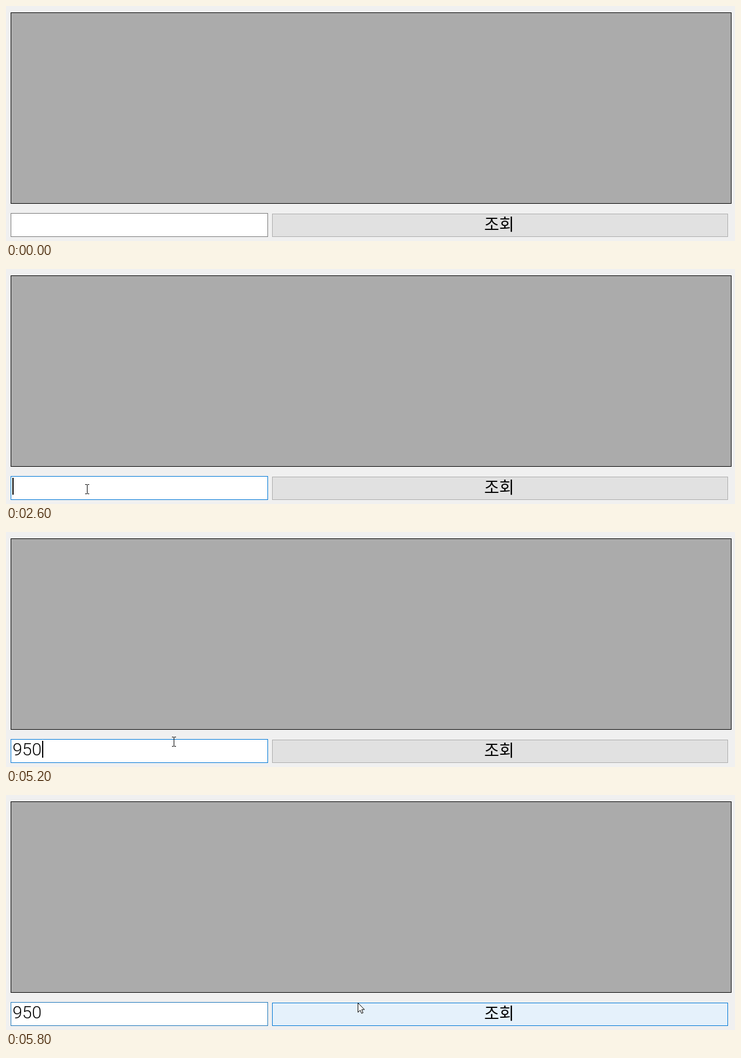
These frames come from a looping animation (1252x404 px, 8000 ms). An HTML page:

```html
<!DOCTYPE html>
<html lang="ko">
<head>
<meta charset="utf-8">
<title>조회</title>
<style>
  html, body { margin: 0; width: 100%; height: 100%; overflow: hidden; background: #f0f0f0; }
  svg { display: block; width: 1252px; height: 404px; }
  rect { shape-rendering: crispEdges; }
  #label { font: 300 28px "Noto Sans CJK KR", "Noto Sans CJK", sans-serif; text-anchor: middle; }
  #value { font: 300 30px Roboto, "Liberation Sans", sans-serif; }
</style>
</head>
<body>
<svg viewBox="0 0 1252 404">
  <rect x="8.5" y="11.5" width="1237" height="328" fill="#ababab" stroke="#000"/>
  <rect id="field" x="8.5" y="356.5" width="441" height="40" fill="#fff"/>
  <rect id="button" x="457.5" y="357.5" width="782" height="39"/>
  <text id="label" x="847" y="386">조회</text>
  <text id="value" x="11.2" y="384.3"></text>
  <rect id="caret" y="359" width="2" height="29"/>
  <path id="arrow" d="M.5.5V16.6L4.3 13 6.7 18.4 9.2 17.4 6.9 11.9H11.6Z" fill="#fff" stroke="#000"/>
  <path id="beam" d="M-3 .5H0M1 .5H4M.5 1V16M-3 16.5H0M1 16.5H4" fill="none" stroke="#000" shape-rendering="crispEdges"/>
</svg>
<script>
const LOOP = 8000;
const el = id => document.getElementById(id);
const [field, button, value, caret, arrow, beam] =
  ['field', 'button', 'value', 'caret', 'arrow', 'beam'].map(el);

const BLUE = '#0078d7';
const looks = {
  idle: ['#e1e1e1', '#adadad'],
  warm: ['#e3e9ee', '#5793c2'],
  hover: ['#e5f1fb', BLUE],
  down: ['#cce4f7', '#005499']
};

// Each step changes only the listed properties.
const steps = [
  [0, { border: '#7a7a7a', look: 'idle', text: '', caret: false, cursor: null, x: 0, y: 0 }],
  [800, { cursor: arrow, x: 131, y: 398 }],
  [900, { border: '#494949', cursor: beam, x: 133, y: 382 }],
  [1000, { border: '#171717', x: 135, y: 378 }],
  [1100, { caret: true }],
  [1200, { border: '#0f3f6b' }],
  [1300, { border: BLUE, y: 377 }],
  [1400, { x: 136, y: 374 }],
  [1500, { x: 138, y: 371 }],
  [1600, { x: 139, y: 370 }],
  [1900, { caret: false }],
  [2600, { caret: true }],
  [3200, { caret: false }],
  [3500, { text: '9', caret: true, cursor: arrow, x: 137, y: 377 }],
  [4100, { caret: false }],
  [4400, { text: '95', caret: true }],
  [4900, { text: '950' }],
  [5200, { cursor: beam, x: 288, y: 352 }],
  [5300, { look: 'warm', cursor: arrow, x: 530, y: 356 }],
  [5400, { look: 'hover', x: 604, y: 357 }],
  [5700, { look: 'down', caret: false }],
  [5800, { border: '#1f78bb', look: 'hover' }]
];

function stateAt(time) {
  const state = {};
  for (const [start, change] of steps) {
    if (start > time) break;
    Object.assign(state, change);
  }
  return state;
}

const show = (node, on) => node.setAttribute('visibility', on ? 'visible' : 'hidden');

function draw() {
  const s = stateAt(performance.now() % LOOP);
  const [fill, edge] = looks[s.look];
  field.setAttribute('stroke', s.border);
  button.setAttribute('fill', fill);
  button.setAttribute('stroke', edge);
  value.textContent = s.text;
  caret.setAttribute('x', 11 + 17 * s.text.length);
  show(caret, s.caret);
  for (const c of [arrow, beam]) {
    c.setAttribute('transform', `translate(${s.x} ${s.y})`);
    show(c, s.cursor === c);
  }
  requestAnimationFrame(draw);
}
draw();
</script>
</body>
</html>
```
